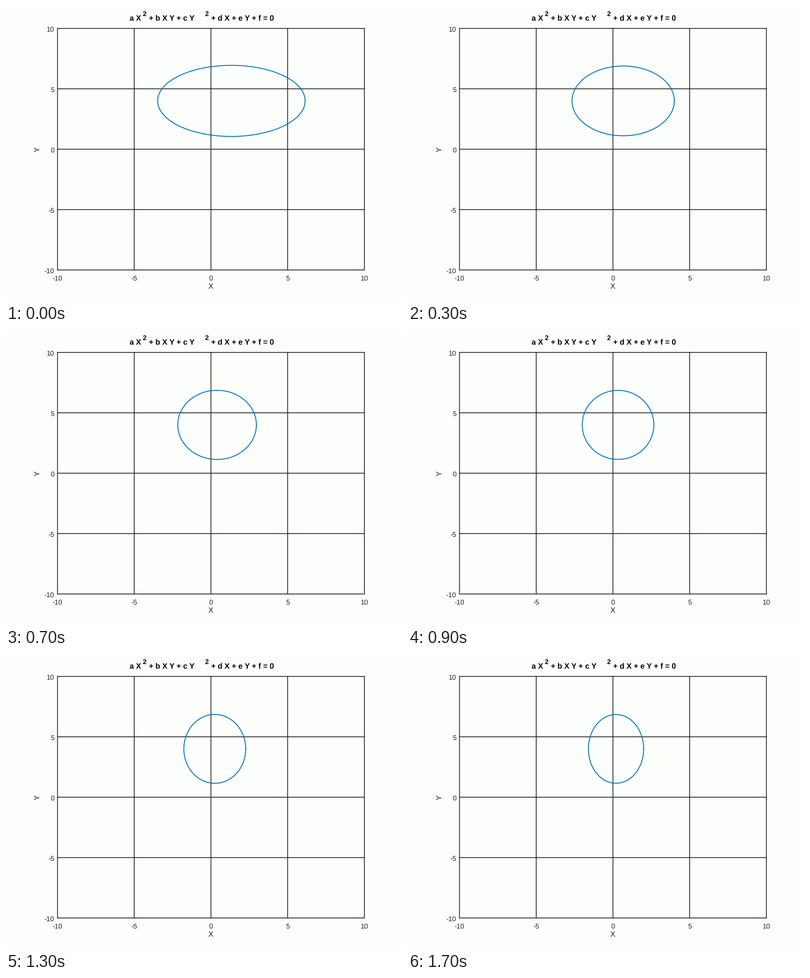
These frames come from a looping animation (865x647 px, 1800 ms). A matplotlib script:

```python
import numpy as np
import matplotlib.pyplot as plt
from matplotlib.animation import FuncAnimation

W, H, DPI = 865, 647, 64
PX = 72 / DPI                      # points per pixel
LEFT, TOP = 112.5, 49              # corner of the plot box
SX, SY = 33.515, 26.4              # pixels per data unit
INK, BLUE, PAPER = "#1e1e1e", "#006fb8", "#fdfffd"
FRAMES, INTERVAL = 18, 100

plt.rcParams["font.family"] = "Liberation Sans"
plt.rcParams["text.hinting"] = "none"

fig = plt.figure(figsize=(W / DPI, H / DPI), dpi=DPI, facecolor=PAPER)
ax = fig.add_axes([0, 0, 1, 1])
ax.set_xlim(0, W)
ax.set_ylim(H, 0)
ax.axis("off")


def to_px(x, y):
    return LEFT + (x + 10) * SX, TOP + (10 - y) * SY


def rule(p, q):
    (x0, y0), (x1, y1) = to_px(*p), to_px(*q)
    ax.plot([x0, x1], [y0, y1], color=INK, lw=1.7 * PX, snap=False,
            solid_capstyle="projecting", zorder=1)


def label(x, y, text, size, **kw):
    opts = dict(color=INK, ha="center", va="baseline")
    opts.update(kw)
    ax.text(x, y, text, fontsize=size * PX, **opts)


for v in range(-10, 11, 5):
    rule((v, -10), (v, 10))
    rule((-10, v), (10, v))
    px, py = to_px(v, v)
    label(px, 599.5, str(v), 15)
    label(105.3, py + 7.2, str(v), 15, ha="right")

label(447.5, 617.5, "X", 16.5)
label(69, 313.3, "Y", 16.5, rotation=90, va="center")

for x, text in [(269.7, "a X"), (312.5, "+ b X Y + c Y"),
                (448.5, "+ d X + e Y + f = 0")]:
    label(x, 31.5, text, 16.7, weight="bold", color="black", ha="left")
for x in (303, 439):
    label(x, 22.2, "2", 14.5, weight="bold", color="black")

curve, = ax.plot([], [], color=BLUE, lw=1.9 * PX, zorder=2)
angle = np.linspace(0, 2 * np.pi, 241)


def draw(i):
    """Conic a x^2 + y^2 - x - 8 y + 8 = 0 with growing a."""
    a = 0.375 + 0.125 * i
    k = 8 + 1 / (4 * a)
    x = 1 / (2 * a) + np.sqrt(k / a) * np.cos(angle)
    y = 4 + np.sqrt(k) * np.sin(angle)
    curve.set_data(*to_px(x, y))
    return curve,


anim = FuncAnimation(fig, draw, frames=FRAMES, interval=INTERVAL,
                     repeat=True, repeat_delay=0)
plt.show()
```
